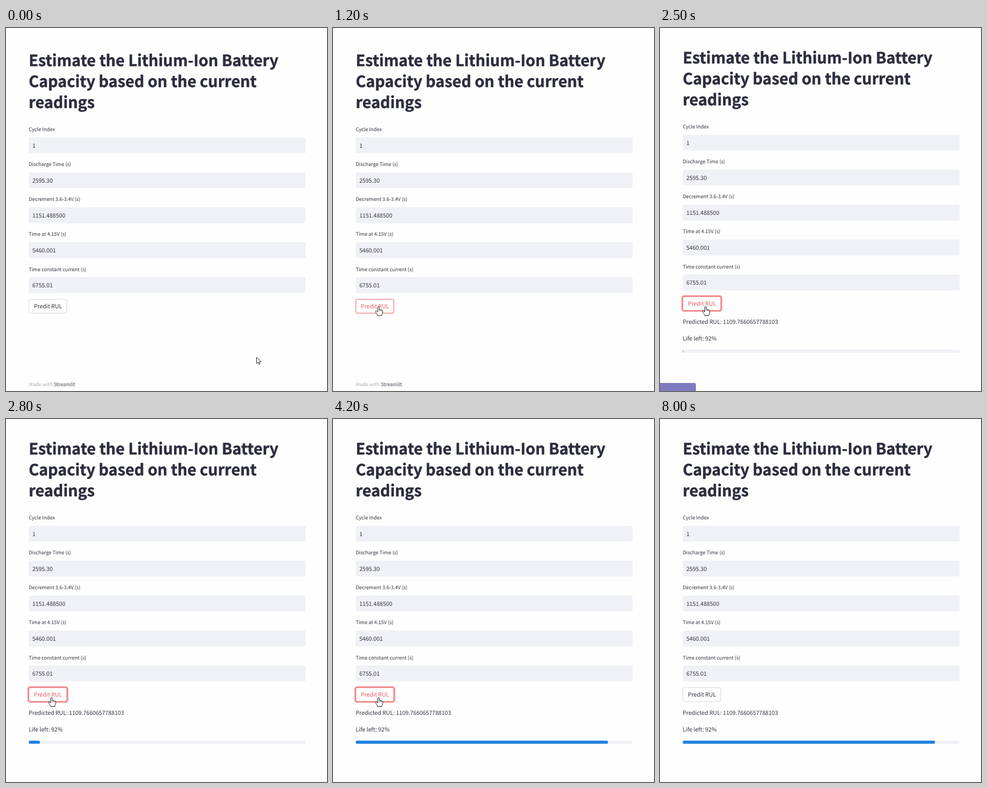
Write an HTML page that moves like this. It is 600 by 676 pixels and loops after 8.1 s.

```html
<!DOCTYPE html>
<html lang="en">
<head>
<meta charset="utf-8">
<title>Battery capacity form</title>
<style>
  html, body { margin: 0; width: 100%; height: 100%; overflow: hidden; background: #fefefe; }
  svg { display: block; width: 600px; height: 676px; }
  text { font-family: "Noto Sans CJK JP", "Noto Sans CJK SC", "Noto Sans CJK KR", "Open Sans", sans-serif;
         fill: #31333f; text-rendering: geometricPrecision; white-space: pre; }
  .title { font-weight: 700; fill: #2c2e3e; stroke: #2c2e3e; stroke-width: .5; }
  .box { fill: #f0f1f6; }
  .cursor path { fill: #fff; stroke: #222; stroke-width: 1; stroke-linejoin: round; }
</style>
</head>
<body>
<svg viewBox="0 0 600 676">
  <g id="page">
    <g id="form"></g>
    <rect id="ring" x="41.3" y="503.8" width="73.8" height="28.4" rx="4" fill="none" stroke="#f49fa2" stroke-width="2.8"/>
    <rect id="button" x="42.7" y="505.2" width="71" height="25.8" rx="2.8" fill="#fefefe"/>
    <text id="caption" class="body" x="52.2" y="522.2">Predit RUL</text>
  </g>
  <text id="footer" class="label" x="42.5" y="666.5" style="fill:#aeafb4">Made with <tspan fill="#83848c" stroke="#83848c" stroke-width=".4">Streamlit</tspan></text>
  <g id="result">
    <text class="body" x="42.5" y="551">Predicted RUL: 1109.7660657788103</text>
    <text class="body" x="42.5" y="582">Life left: 92%</text>
    <rect class="box" x="42.5" y="599" width="517.5" height="5.8" rx="2.9"/>
    <rect id="bar" x="42.5" y="599" height="5.8" rx="2.9" fill="#1f82e0"/>
  </g>
  <path id="status" d="M0 661H64Q67 661 67 664V676H0Z" fill="#7f7bc0"/>
  <g id="arrow" class="cursor"><path d="M.5 .5V12.4L3.3 9.8L5.2 14L7 13.2L5.2 9.1H9Z"/></g>
  <g id="hand" class="cursor">
    <path d="M-1.4 1.2Q0 -.5 1.4 1.2V6Q2.8 5 4 6.4Q5.4 5.6 6 7Q7.6 6.6 7.8 8.2V12Q7.6 14 6.4 15.4V17.3H-1.6V15.8Q-4 13 -5.4 10.4Q-6 8.5 -4.4 8.5Q-3 8.8 -1.4 10.6Z"/>
    <path d="M1.4 6V8.6M4 6.4V8.8M6 7V9" style="stroke-width:.8"/>
  </g>
</svg>
<script>
const $ = id => document.getElementById(id);
const LOOP = 8100, STEP = 100, LEFT = 42.5, PITCH = 65.05;

const titleLines = ["Estimate the Lithium-Ion Battery", "Capacity based on the current", "readings"];
const fields = [
  ["Cycle Index", "1"],
  ["Discharge Time (s)", "2595.30"],
  ["Decrement 3.6-3.4V (s)", "1151.488500"],
  ["Time at 4.15V (s)", "5460.001"],
  ["Time constant current (s)", "6755.01"]
];

const text = (cls, x, y, s) => `<text class="${cls}" x="${x}" y="${y}">${s}</text>`;
$("form").innerHTML =
  titleLines.map((s, i) => text("title", LEFT, 71 + 39.1 * i, s)).join("") +
  fields.map(([label, value], i) => {
    const y = PITCH * i;
    return text("label", LEFT, 192.3 + y, label) +
      `<rect class="box" x="${LEFT}" y="${203.7 + y}" width="517.5" height="29.6" rx="3"/>` +
      text("body", 49.2, 223 + y, value);
  }).join("");

// Font size at which a line has the given natural width
const pen = document.createElement("canvas").getContext("2d");
function sizeFor(weight, line, width) {
  pen.font = `${weight} 100px ${getComputedStyle($("caption")).fontFamily}`;
  return 100 * width / pen.measureText(line).width;
}
const bodySize = sizeFor(400, "Predicted RUL: 1109.7660657788103", 178.2);
const sizes = { title: sizeFor(700, titleLines[0], 467), body: bodySize, label: bodySize * 14 / 16 };
for (const cls in sizes)
  document.querySelectorAll("." + cls).forEach(e => e.style.fontSize = sizes[cls] + "px");

// Linear interpolation through [time, value...] points
function along(points, t) {
  if (t <= points[0][0]) return points[0].slice(1);
  const i = points.findIndex(p => p[0] >= t);
  if (i < 0) return points[points.length - 1].slice(1);
  const a = points[i - 1], b = points[i], k = (t - a[0]) / (b[0] - a[0]);
  return a.slice(1).map((v, j) => v + (b[j + 1] - v) * k);
}

const barEdge = [[2500, 43.3], [2700, 53], [2900, 74], [3100, 109], [3300, 158.6], [3500, 242],
                 [3800, 390], [4000, 476], [4200, 514]];
const settle = [[900, 95.5, 523.5], [1000, 89, 521], [1100, 79.5, 516], [1200, 85, 518.2]];

function cursorAt(t) {
  if (t < 900) {
    const p = t / 900, k = p * p * (3 - 2 * p);
    return [468 - 372.5 * k, 612.6 - 89.1 * k];
  }
  if (t <= 5300) return along(settle, t);
  const p = Math.min(1, (t - 5300) / 600);
  return [85 + 34 * p, 518.2 + 165 * p ** 1.5];
}

const show = (id, on) => $(id).style.display = on ? "" : "none";

function draw(t) {
  const done = t >= 2500, shift = done ? -5 : 0;
  $("page").setAttribute("transform", `translate(0 ${shift})`);
  show("result", done);
  show("footer", !done);
  show("status", done && t < 2700);
  $("bar").setAttribute("width", along(barEdge, t)[0] - LEFT);

  const [x, y] = cursorAt(t);
  const over = x > 42 && x < 114 && y > 505 + shift && y < 531 + shift;
  const focus = t >= 2300 && t < 8000, red = over || focus;
  show("hand", over);
  show("arrow", !over);
  $(over ? "hand" : "arrow").setAttribute("transform", `translate(${x} ${y})`);
  show("ring", focus);
  $("button").setAttribute("stroke", red ? "#e8595d" : "#d6d6d9");
  $("caption").style.fill = red ? "#e8595d" : "";
}

function tick() {
  draw(Math.floor(performance.now() % LOOP / STEP) * STEP);
  requestAnimationFrame(tick);
}
tick();
</script>
</body>
</html>
```
